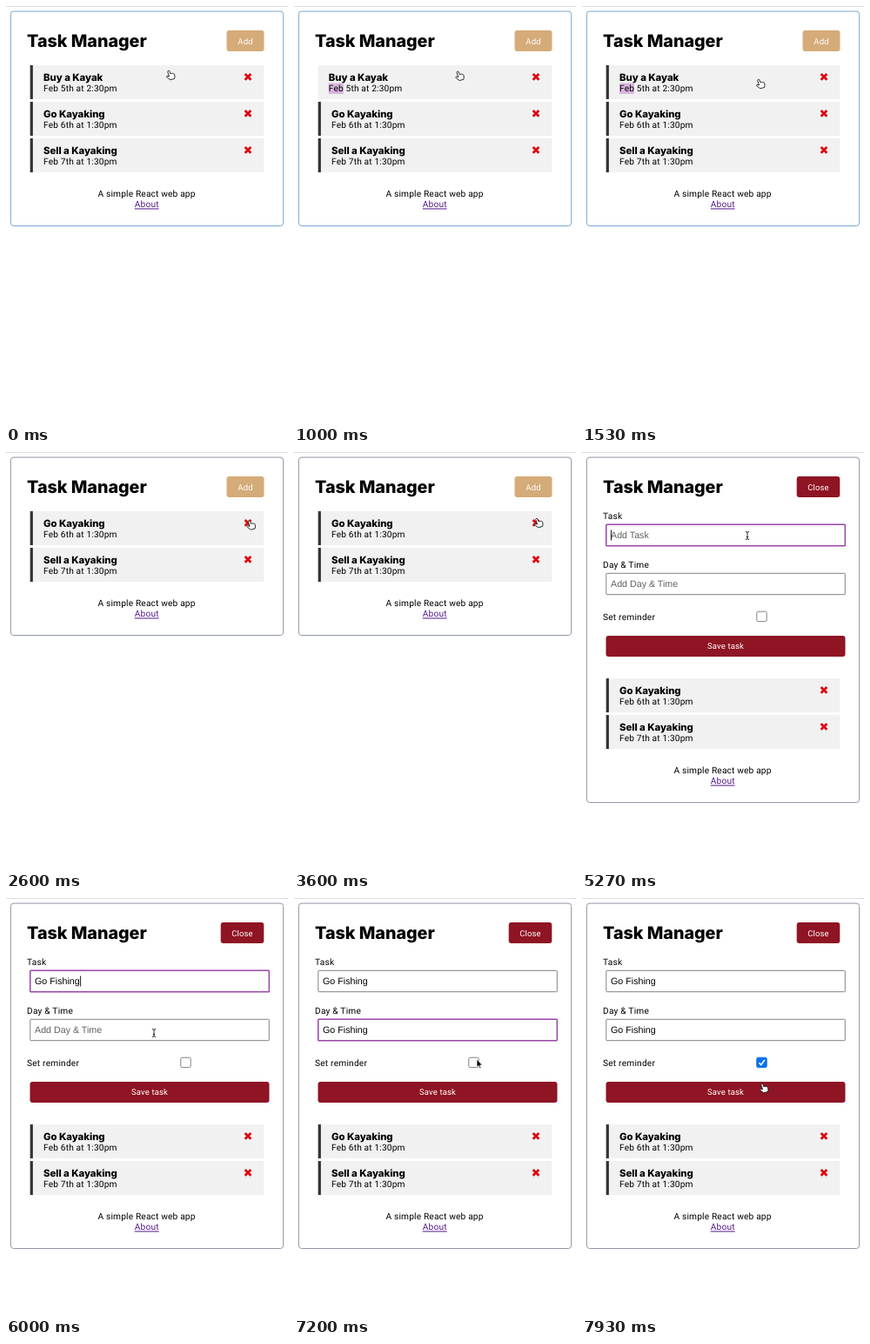
An HTML page that plays this animation: 324x480 px, repeating every 8 s.

```html
<!DOCTYPE html>
<html lang="en">
<head>
<meta charset="utf-8">
<title>Task Manager</title>
<style>
  html, body { margin: 0; width: 100%; height: 100%; overflow: hidden; background: #fff; }
  svg { display: block; width: 324px; height: 480px; }
  text { font: 400 10.2px Roboto, sans-serif; letter-spacing: .15px; text-rendering: geometricPrecision; }
  .head { font: 800 19.8px Inter, sans-serif; letter-spacing: -.05px; }
  .title { font: 800 11.4px Inter, sans-serif; letter-spacing: -.05px; }
  .label { letter-spacing: .2px; }
  .button { font-size: 9.5px; fill: #fff; text-anchor: middle; }
  .mid { text-anchor: middle; }
  .link { fill: #551a8b; text-decoration: underline; }
  .value { font: 10.7px "Liberation Sans", Arial, sans-serif; letter-spacing: 0; }
</style>
</head>
<body>
<svg id="stage" viewBox="0 0 324 480"></svg>
<script>
const LOOP = 8000, FPS = 15;
const ROW_STEP = 42, FORM_HEIGHT = 192, BAR = 3.2;
const RED = '#8f1424', TAN = '#d5ab79', GREY = '#828282', FOCUS = '#9a45a8';

// Moments of the interaction, in ms
const AT = {
  off: 70, select: 130, deselect: 1400, on: 1530, remove: 2600, open: 4200,
  focusTask: 5270, pasteTask: 5600, focusDay: 6200, pasteDay: 6600,
  caretOff: 7130, blur: 7400, check: 7470
};

// Pointer path: time, x, y of the hotspot
const PATH = [
  [0, 188, 74], [930, 188, 74], [1330, 204, 84], [1730, 204, 84],
  [2000, 165, 222], [2330, 281, 81], [2530, 281, 81], [2670, 280, 76],
  [3600, 280, 76], [3700, 285, 80], [3930, 276, 41], [4200, 276, 41],
  [4400, 277, 47], [4600, 277, 47], [5000, 190, 96], [5670, 190, 96],
  [6000, 170, 155], [6730, 170, 155], [7200, 210, 185], [7470, 210, 185],
  [7930, 208, 213], [LOOP, 208, 213]
];

const stage = document.getElementById('stage');

function add(parent, tag, attrs = {}, content = '') {
  const el = document.createElementNS('http://www.w3.org/2000/svg', tag);
  for (const k in attrs) el.setAttribute(k, attrs[k]);
  el.textContent = content;
  return parent.appendChild(el);
}
const group = parent => add(parent, 'g');
const rect = (parent, x, y, width, height, fill, more) =>
  add(parent, 'rect', { x, y, width, height, fill, ...more });
const text = (parent, cls, x, y, content) => add(parent, 'text', { class: cls, x, y }, content);
const show = (el, on) => el.setAttribute('visibility', on ? 'visible' : 'hidden');
const shift = (el, x, y) => el.setAttribute('transform', `translate(${x} ${y})`);

function button(parent, x, y, width, fill, label) {
  const g = group(parent);
  rect(g, x, y, width, 24, fill, { rx: 3 });
  text(g, 'button', x + width / 2, y + 15.4, label);
  return g;
}

function row(title, date) {
  const g = group(list);
  rect(g, 27.7, 0, 268.6, 39, '#f1f1f1');
  const bar = rect(g, 27.7, 0, BAR, 39, '#333');
  const body = group(g);
  const mark = rect(body, 43, 20.6, 17, 12.4, '#d9b6de');
  show(mark, false);
  text(body, 'title', 43, 17.6, title);
  text(body, '', 43, 30.4, date);
  add(g, 'path', {
    d: 'M274.6 10l6.8 6.8m0 -6.8l-6.8 6.8', stroke: '#dc0a14', 'stroke-width': 2.8
  });
  return { g, bar, body, mark };
}

function field(y, label, hint) {
  text(form, 'label', 24, y - 6, label);
  const box = rect(form, 27.8, y + .3, 274.5, 24.4, '#fff', { rx: .8 });
  const value = text(form, 'value', 33, y + 16, hint);
  const caret = rect(form, 33, y + 6.5, .9, 12, '#000');
  return (focus, filled, blink) => {
    box.setAttribute('stroke', focus ? FOCUS : GREY);
    box.setAttribute('stroke-width', focus ? 1.5 : 1);
    value.textContent = filled ? 'Go Fishing' : hint;
    value.setAttribute('fill', filled ? '#000' : '#606060');
    caret.setAttribute('x', filled ? 85.2 : 33);
    caret.setAttribute('visibility', focus && blink ? 'inherit' : 'hidden');
  };
}

rect(stage, 0, 0, 324, 1, '#dcdcdc');
const frame = rect(stage, 5.4, 6.1, 313.2, 246, '#fff', { rx: 3.4 });
text(stage, 'head', 24, 47.2, 'Task Manager');
const addButton = button(stage, 253.5, 28.1, 43, TAN, 'Add');
const closeButton = button(stage, 246.7, 28.1, 49.6, RED, 'Close');

const form = group(stage);
const drawTask = field(83, 'Task', 'Add Task');
const drawDay = field(139, 'Day & Time', 'Add Day & Time');
text(form, 'label', 24, 193, 'Set reminder');
const box = rect(form, 200.8, 183.2, 11.4, 11.4, '#fff', { rx: 1.6 });
const tick = add(form, 'path', {
  d: 'M203.4 189.2l2.3 2.4l4.2 -5.6', fill: 'none', stroke: '#fff', 'stroke-width': 1.6
});
button(form, 27.5, 211, 275, RED, 'Save task');

const list = group(stage);
const rows = [
  row('Buy a Kayak', 'Feb 5th at 2:30pm'),
  row('Go Kayaking', 'Feb 6th at 1:30pm'),
  row('Sell a Kayaking', 'Feb 7th at 1:30pm')
];
const footer = group(stage);
text(footer, 'mid', 161.6, -33.6, 'A simple React web app');
text(footer, 'mid link', 161.7, -21.6, 'About');

const outline = { 'stroke-width': .8, 'stroke-linejoin': 'round' };
const hand = group(stage);
add(hand, 'path', {
  d: 'M-1.2 1Q-1.1 0 0 0Q.9 0 1 1L1.3 4Q2.2 3.3 3 4.2Q4 3.7 4.5 4.8Q5.7 4.6 5.7 6'
    + 'L5.3 8.8L4.4 10.6H-.6L-3.4 7.2Q-4.4 5.5 -2.9 5.4L-.8 6.6Z',
  fill: '#fff', stroke: '#111', transform: 'rotate(-14 .5 5.5)', ...outline
});
const cursors = {
  hand,
  arrow: add(stage, 'path', {
    d: 'M0 0V9.4L2.1 7.5L3.5 10.7L5 10L3.6 7H6.4Z', fill: '#000', stroke: '#fff', ...outline
  }),
  beam: add(stage, 'path', {
    d: 'M-2.2 -4.5Q0 -4.5 0 -3.3Q0 -4.5 2.2 -4.5M0 -3.5V3.5M-2.2 4.5Q0 4.5 0 3.3Q0 4.5 2.2 4.5M-1.2 1.5H1.2',
    fill: 'none', stroke: '#111', 'stroke-width': .9
  })
};

function pointerAt(t) {
  const i = PATH.findIndex(p => p[0] > t);
  const [t0, x0, y0] = PATH[i - 1], [t1, x1, y1] = PATH[i];
  const u = (t - t0) / (t1 - t0), e = u * u * (3 - 2 * u);
  return [x0 + (x1 - x0) * e, y0 + (y1 - y0) * e];
}

function cursorKind(x, y, open, top, count, bottom) {
  const over = (l, t, r, b) => x >= l && x <= r && y >= t && y <= b;
  if (open && (over(27, 83, 303, 108) || over(27, 139, 303, 164))) return 'beam';
  const inRow = over(27, top, 297, top + count * ROW_STEP - 3) && (y - top) % ROW_STEP <= 39;
  const inButton = over(open ? 247 : 253, 28, 297, 52) || (open && over(27, 211, 303, 235));
  return inRow || inButton || over(148, bottom - 33, 176, bottom - 19) ? 'hand' : 'arrow';
}

function draw(t) {
  const open = t >= AT.open, removed = t >= AT.remove;
  const count = removed ? 2 : 3;
  const top = 68 + (open ? FORM_HEIGHT : 0);
  const bottom = top + count * ROW_STEP + 59;

  frame.setAttribute('height', bottom - 6.6);
  frame.setAttribute('stroke', removed ? '#9097a8' : '#78a8d8');
  show(addButton, !open);
  show(closeButton, open);
  show(form, open);
  shift(footer, 0, bottom);

  rows.forEach((r, i) => shift(r.g, 0, top + (i - (removed ? 1 : 0)) * ROW_STEP));
  const first = rows[0];
  const bare = t >= AT.off && t < AT.on;
  first.g.setAttribute('display', removed ? 'none' : 'inline');
  show(first.bar, !bare);
  shift(first.body, bare ? -BAR : 0, 0);
  show(first.mark, (t >= AT.select && t < AT.deselect) || t >= AT.on);

  drawTask(t >= AT.focusTask && t < AT.focusDay, t >= AT.pasteTask, true);
  drawDay(t >= AT.focusDay && t < AT.blur, t >= AT.pasteDay, t < AT.caretOff);

  const checked = t >= AT.check;
  box.setAttribute('fill', checked ? '#0b6fee' : '#fff');
  box.setAttribute('stroke', checked ? '#0b6fee' : GREY);
  tick.setAttribute('visibility', checked ? 'inherit' : 'hidden');

  const [x, y] = pointerAt(t);
  const kind = cursorKind(x, y, open, top, count, bottom);
  for (const k in cursors) show(cursors[k], k === kind);
  shift(cursors[kind], x, y);
}

// The screen refreshes at a fixed rate, rounded to 10 ms
function tickFrame() {
  const step = Math.floor((performance.now() % LOOP) * FPS / 1000 + .06);
  draw(Math.min(Math.round(step * 100 / FPS) * 10, LOOP - 1));
  requestAnimationFrame(tickFrame);
}
tickFrame();
</script>
</body>
</html>
```
